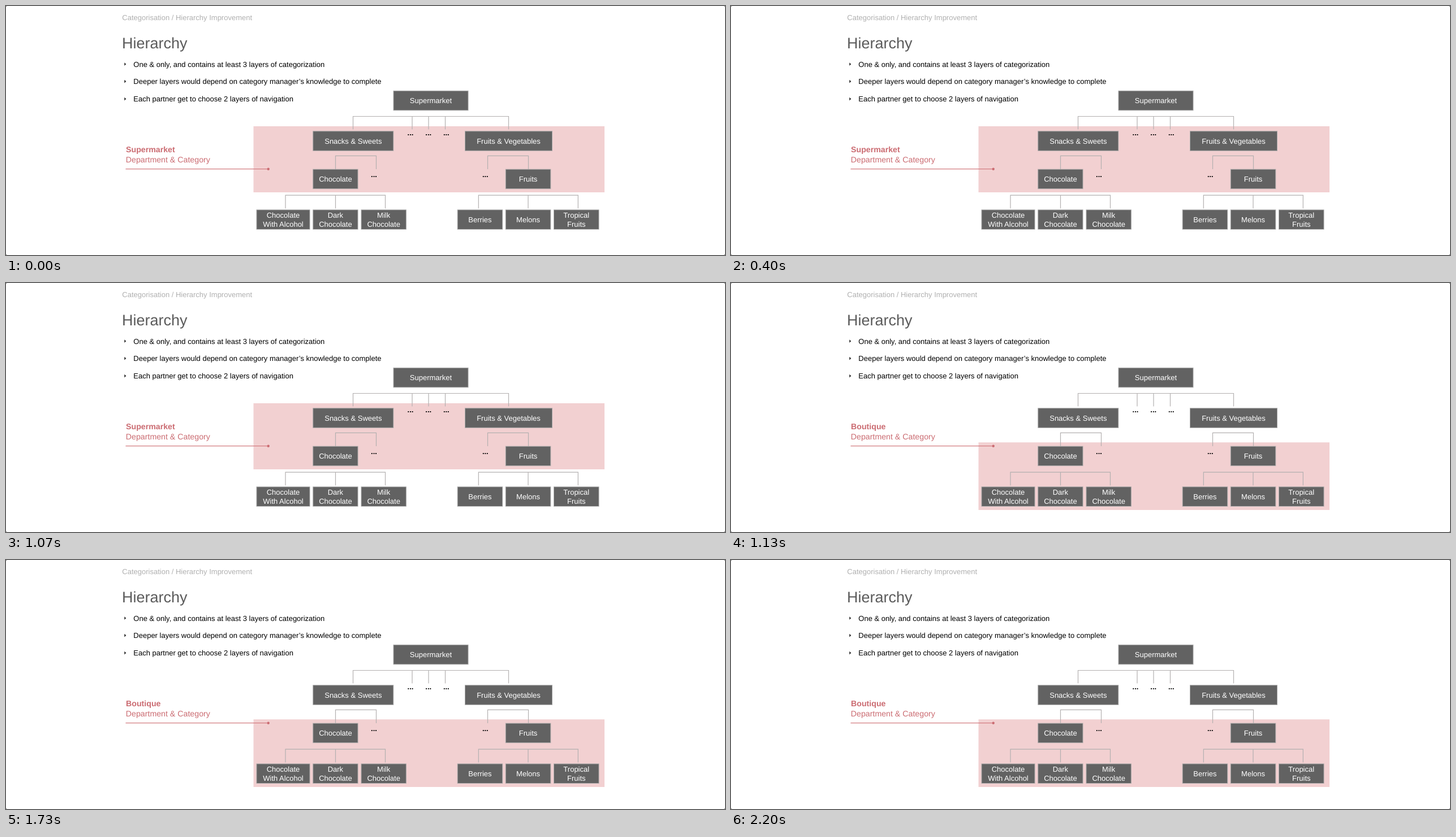
Animation of 1271 by 441 pixels, one loop 2.39 s. Source, as an HTML page:

```html
<!DOCTYPE html>
<html lang="en">
<head>
<meta charset="utf-8">
<title>Hierarchy</title>
<style>
html, body { margin: 0; width: 100%; height: 100%; overflow: hidden; background: #fff; }
svg { display: block; width: 1271px; height: 441px; }
text { font: 13px "Liberation Sans", Arial, sans-serif; text-rendering: geometricPrecision; }
.head { fill: #b0b0b0; }
.title { font-size: 27px; fill: #5b5b5b; }
.note { font-size: 14.2px; fill: #cb6c72; }
.bold { font-weight: bold; }
.mid { text-anchor: middle; }
.label { fill: #fff; }
.box { fill: #626262; stroke: #a8a8a8; }
.link { fill: none; stroke: #b3b0b0; stroke-width: 1.2; }
</style>
</head>
<body>
<svg id="stage" viewBox="0 0 1271 441">
  <path d="M0 0h2Q0 0 0 2zM1271 0v2q0-2-2-2zM0 441v-2q0 2 2 2zM1271 441h-2q2 0 2-2z" fill="#444"/>
  <rect id="band" x="437.5" width="620.5" fill="#f2d0d1"/>
  <text class="head" x="205.3" y="25.3">Categorisation / Hierarchy Improvement</text>
  <text class="title" x="205" y="75.2">Hierarchy</text>
  <text class="note bold" id="shop" x="212" y="259.3"></text>
  <text class="note" x="211.8" y="277">Department &amp; Category</text>
  <path d="M211.5 288.7H464" stroke="#d27b80" stroke-width="1.2"/>
  <circle cx="463.7" cy="288.7" r="2.2" fill="#cb6c72"/>
</svg>
<script>
const LOOP = 2390, SWITCH = 1130;
const stage = document.getElementById("stage");
const band = document.getElementById("band");
const shop = document.getElementById("shop");

function add(tag, attrs, content = "") {
  const el = document.createElementNS("http://www.w3.org/2000/svg", tag);
  for (const key in attrs) el.setAttribute(key, attrs[key]);
  el.textContent = content;
  stage.append(el);
}

function bullet(y, content) {
  add("path", { d: `M209.3 ${y - 2.8}l3 2.8l-3 2.8z`, fill: "#222" });
  add("text", { x: 225.3, y: y + 4.7 }, content);
}

// A horizontal bar with a drop at each x.
function links(y, bottom, ...xs) {
  const drops = xs.slice(1, -1).map(x => `M${x} ${y}V${bottom}`).join("");
  add("path", { class: "link", d: `M${xs[0]} ${bottom}V${y}H${xs.at(-1)}V${bottom}${drops}` });
}

function box(x, y, width, ...lines) {
  add("rect", { class: "box", x, y, width, height: 34.5 });
  lines.forEach((line, i) => add("text", {
    class: "mid label", x: x + width / 2,
    y: y + 22 + (i - (lines.length - 1) / 2) * 15.4
  }, line));
}

function dots(y, ...xs) {
  for (const x of xs) add("text", { class: "mid bold", x, y }, "...");
}

bullet(103, "One & only, and contains at least 3 layers of categorization");
bullet(133.6, "Deeper layers would depend on category manager’s knowledge to complete");
bullet(164.6, "Each partner get to choose 2 layers of navigation");

links(195.5, 218.5, 613.5, 718, 747, 776.5, 888.5);
links(265.3, 289, 582.5, 654.5);
links(265.3, 289, 851.5, 923.5);
links(335.2, 358.5, 494, 582.5, 670.5);
links(335.2, 358.5, 835.3, 923, 1011.3);

box(685, 150.3, 132, "Supermarket");
box(542.8, 221.8, 142, "Snacks & Sweets");
box(811.5, 221.8, 154, "Fruits & Vegetables");
box(542.8, 289.2, 79.2, "Chocolate");
box(883.3, 289.2, 79.5, "Fruits");
box(443, 361, 94, "Chocolate", "With Alcohol");
box(542.8, 361, 79.2, "Dark", "Chocolate");
box(628, 361, 79.3, "Milk", "Chocolate");
box(798.2, 361, 79.5, "Berries");
box(883.3, 361, 79.5, "Melons");
box(968.5, 361, 79.5, "Tropical", "Fruits");

dots(228.6, 715, 746.7, 778.3);
dots(303, 650.5, 847.3);

function draw() {
  const lower = performance.now() % LOOP >= SWITCH;
  band.setAttribute("y", lower ? 282.3 : 213);
  band.setAttribute("height", lower ? 119.7 : 117);
  shop.textContent = lower ? "Boutique" : "Supermarket";
  requestAnimationFrame(draw);
}
draw();
</script>
</body>
</html>
```
